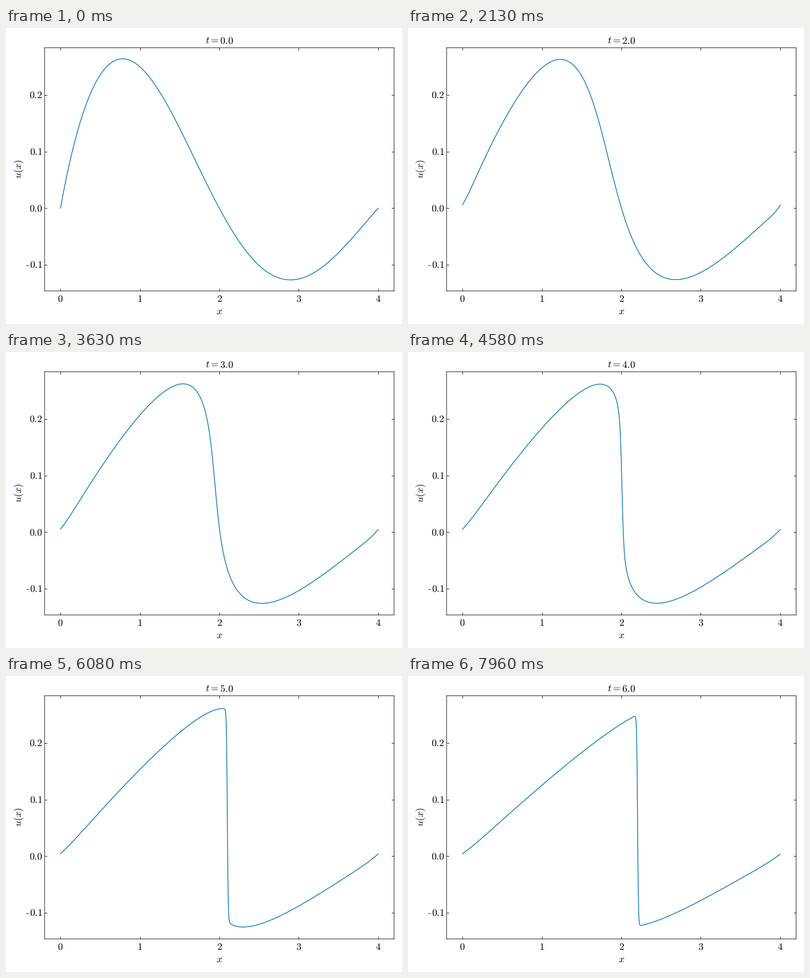
Recreate the animation shown at these times as a matplotlib script. Size 800x600 px, loop 8 s.

```python
import matplotlib.pyplot as plt
import numpy as np
from matplotlib.animation import FuncAnimation
from matplotlib.patches import Rectangle

W, H = 800, 600
PT = 0.72  # points per pixel at 100 dpi
LEFT, RIGHT, TOP, BOTTOM = 78, 784, 40, 533
FRAMES, FPS = 192, 24
DT = 10 / 299  # model time per frame
SUBSTEPS = 10

# Periodic grid and viscosity for Burgers' equation
N, LENGTH, NU = 1024, 4.0, 0.001
x = np.linspace(0, LENGTH, N)
k = 2 * np.pi / LENGTH * np.arange(N // 2 + 1)

plt.rcParams.update({
    "mathtext.fontset": "cm",
    "text.hinting": "none",
    "path.simplify": False,
})


def advection(v):
    u = np.fft.irfft(v, N)
    return -0.5j * k * np.fft.rfft(u * u)


def solve():
    """Pseudo-spectral RK4 with an integrating factor for diffusion."""
    h = DT / SUBSTEPS
    half = np.exp(-NU * k**2 * h / 2)
    full = half**2
    u = np.sin(np.pi * x / 2) / (2 * (1 + x))
    v = np.fft.rfft(u)
    states = [u]
    for _ in range(FRAMES - 1):
        for _ in range(SUBSTEPS):
            a = advection(v)
            b = advection(half * (v + h / 2 * a))
            c = advection(half * v + h / 2 * b)
            d = advection(full * v + h * half * c)
            v = full * v + h / 6 * (full * a + 2 * half * (b + c) + d)
        states.append(np.fft.irfft(v, N))
    return states


def padded(values):
    lo, hi = values.min(), values.max()
    pad = 0.05 * (hi - lo)
    return lo - pad, hi + pad


states = solve()

fig = plt.figure(figsize=(8, 6), dpi=100, facecolor="white")
ax = fig.add_axes([LEFT / W, 1 - BOTTOM / H, (RIGHT - LEFT) / W, (BOTTOM - TOP) / H])
x_lim, y_lim = padded(x), padded(states[0])
ax.set_xlim(x_lim)
ax.set_ylim(y_lim)
x_ticks = [0, 1, 2, 3, 4]
y_ticks = [-0.1, 0.0, 0.1, 0.2]
ax.set_xticks(x_ticks)
ax.set_yticks(y_ticks)
ax.tick_params(direction="in", length=5 * PT, width=PT, top=True, right=True,
               labelbottom=False, labelleft=False)
for spine in ax.spines.values():
    spine.set_linewidth(PT)
    spine.set_snap(False)


def label(px, py, text, ha="center", va="baseline", **kw):
    return fig.text(px / W, 1 - py / H, f"${text}$", fontsize=20 * PT,
                    ha=ha, va=va, **kw)


for value in x_ticks:
    px = LEFT + (value - x_lim[0]) / (x_lim[1] - x_lim[0]) * (RIGHT - LEFT)
    label(px, 555, str(value))

for value in y_ticks:
    py = BOTTOM - (value - y_lim[0]) / (y_lim[1] - y_lim[0]) * (BOTTOM - TOP)
    base = py + 5.7
    label(73.7, base, f"{abs(value):.1f}", ha="right")
    if value < 0:  # short hyphen instead of a math minus
        fig.add_artist(Rectangle((41.2 / W, 1 - (base - 3.7) / H), 5.2 / W, 1.2 / H,
                                 facecolor="black", linewidth=0))

label(431, 580.5, "x")
label(37.5, 285.3, "u(x)", ha="right", va="center", rotation=90)
title = label(431.5, 32, "t = 0.0")
line, = ax.plot(x, states[0], color="#0072B2", linewidth=1.5 * PT)


def draw(i):
    line.set_ydata(states[i])
    title.set_text(f"$t = {round(i * DT)}.0$")
    return line, title


def reset():
    return draw(0)


anim = FuncAnimation(fig, draw, frames=FRAMES, init_func=reset,
                     interval=1000 / FPS, repeat=True, repeat_delay=0)
plt.show()
```
